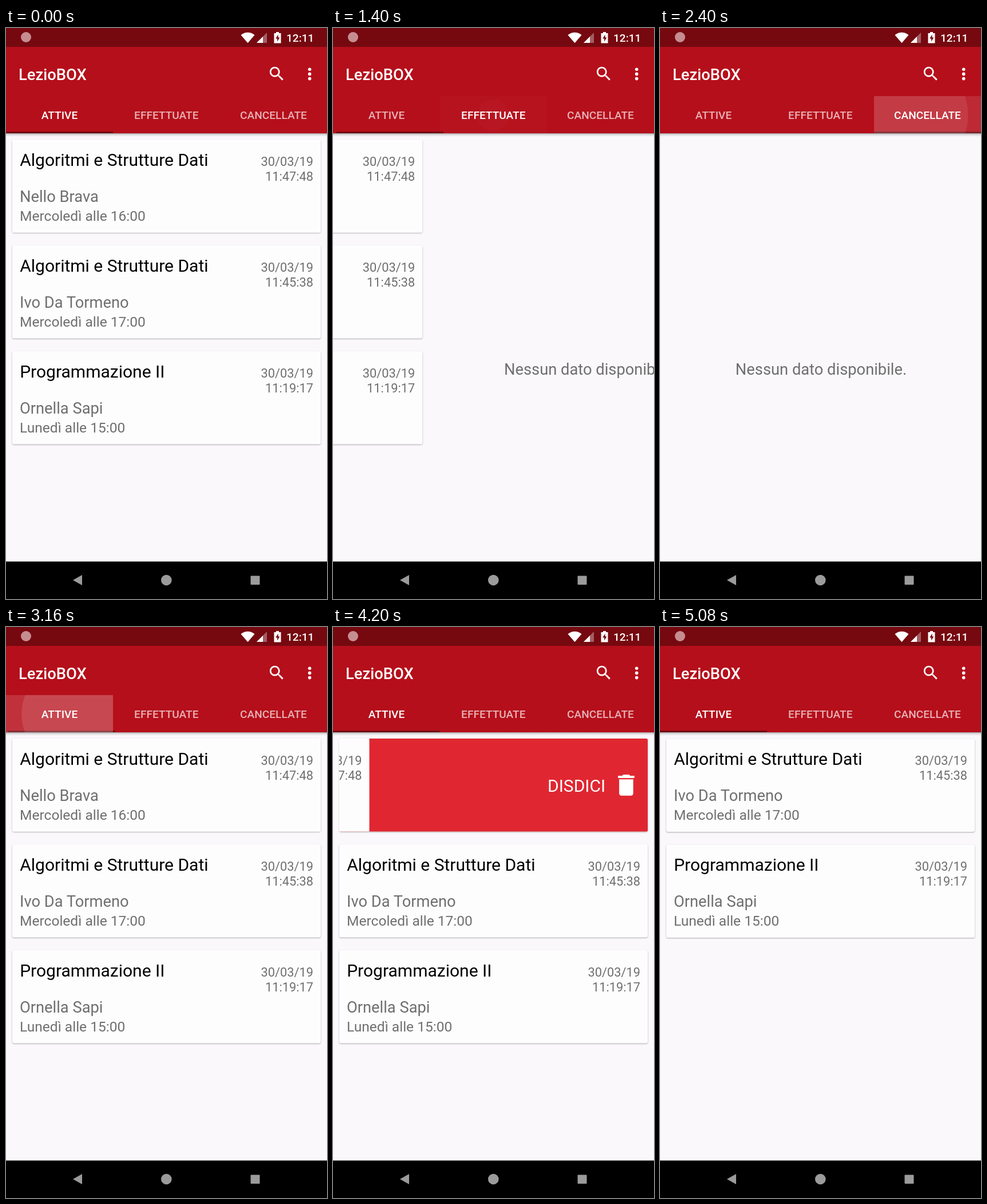
Recreate the animation shown at these times as an HTML page. Size 561 px wide and 998 px high, loop 5.52 s.

```html
<!DOCTYPE html>
<html lang="it">
<head>
<meta charset="utf-8">
<style>
  html, body { margin: 0; width: 100%; height: 100%; overflow: hidden; background: #faf8fb; }
  #stage { display: block; width: 561px; height: 998px; font-family: Roboto, sans-serif; }
  .medium { font-weight: 500; }
  .tab { font-size: 19.1px; text-anchor: middle; fill: #fff; }
  .course { font-size: 30px; fill: #000; }
  .grey { fill: #6f6f6f; }
  .big { font-size: 27.3px; }
  .slot { font-size: 24.55px; }
  .stamp { font-size: 21.8px; text-anchor: end; }
  .shadow { filter: drop-shadow(0 1.5px 1.3px rgba(0, 0, 0, .32)); }
</style>
</head>
<body>
<svg id="stage" viewBox="0 0 561 998" xmlns="http://www.w3.org/2000/svg">
  <defs>
    <clipPath id="frame"><rect x="10.5" y="195" width="540" height="163" rx="3"/></clipPath>
    <linearGradient id="drop" x2="0" y2="1">
      <stop offset="0" stop-color="#000" stop-opacity=".36"/>
      <stop offset=".4" stop-color="#000" stop-opacity=".12"/>
      <stop offset="1" stop-color="#000" stop-opacity="0"/>
    </linearGradient>
  </defs>
  <rect width="561" height="998" fill="#faf8fb"/>

  <g id="pages">
    <g id="cards"></g>
    <text class="grey big" x="842.5" y="606" text-anchor="middle">Nessun dato disponibile.</text>
    <text class="grey big" x="1403.5" y="606" text-anchor="middle">Nessun dato disponibile.</text>
  </g>

  <rect y="184" width="561" height="6" fill="url(#drop)"/>
  <rect y="32" width="561" height="152" fill="#b50f1b"/>
  <rect width="561" height="33" fill="#760910"/>

  <g fill="#fff">
    <circle cx="35" cy="16" r="9" fill="#c68d91"/>
    <path d="M410.5 12.2Q422.5 3.4 434.5 12.2L422.5 26.2Z"/>
    <path d="M456 8V26H438Z" opacity=".35"/>
    <path d="M449 15V26H438Z"/>
    <path d="M472 7h5v2h3.5v17.5h-12V9h3.5z"/>
    <path d="M475.6 11.5l-4.4 7h2.9v5.2l4.3-7.2h-2.8z" fill="#760910"/>
    <text class="medium" x="490" y="24" font-size="19.1">12:11</text>
    <text class="medium" x="22" y="91" font-size="27.3">LezioBOX</text>
    <path transform="translate(456.8 63.7) scale(1.364)" d="M15.5 14h-.79l-.28-.27C15.41 12.59 16 11.11 16 9.5 16 5.91 13.09 3 9.5 3S3 5.91 3 9.5 5.91 16 9.5 16c1.61 0 3.09-.59 4.23-1.57l.27.28v.79l5 4.99L20.49 19l-4.99-5zm-6 0C7.01 14 5 11.99 5 9.5S7.01 5 9.5 5 14 7.01 14 9.5 11.99 14 9.5 14z"/>
    <circle cx="530.7" cy="72.2" r="2.8"/>
    <circle cx="530.7" cy="80.4" r="2.8"/>
    <circle cx="530.7" cy="88.6" r="2.8"/>
  </g>

  <rect id="indicator" y="181.2" width="187" height="2.8" fill="#6d0910"/>
  <svg id="ripple" y="119" width="187" height="65" fill="#fff">
    <rect width="187" height="65" opacity=".14"/>
    <circle id="wave" cy="33" opacity=".11"/>
  </svg>
  <text class="tab medium" x="93.5" y="159">ATTIVE</text>
  <text class="tab medium" x="280.3" y="159">EFFETTUATE</text>
  <text class="tab medium" x="467.5" y="159">CANCELLATE</text>

  <rect y="932.5" width="561" height="65.5"/>
  <g fill="#9b9b9b">
    <path d="M117 965L133 956V974Z"/>
    <circle cx="280.3" cy="965" r="9.3"/>
    <rect x="427.5" y="957.5" width="16" height="15.5" rx="1"/>
  </g>
</svg>

<script>
const LOOP = 5520, WIDTH = 561, TAB = 187, PITCH = 185;
const $ = id => document.getElementById(id);

const bookings = [
  ['Algoritmi e Strutture Dati', 'Nello Brava', 'Mercoledì alle 16:00', '11:47:48'],
  ['Algoritmi e Strutture Dati', 'Ivo Da Tormeno', 'Mercoledì alle 17:00', '11:45:38'],
  ['Programmazione II', 'Ornella Sapi', 'Lunedì alle 15:00', '11:19:17']
];

const box = attrs => `<rect x="11" y="195" width="539" height="162.5" ${attrs}/>`;
const base = box('class="shadow" rx="3" fill="#fefdfe"');
const content = ([course, tutor, slot, time]) => `
  <text class="course" x="24.2" y="241">${course}</text>
  <text class="grey big" x="24" y="304">${tutor}</text>
  <text class="grey slot" x="24" y="337">${slot}</text>
  <text class="grey stamp" x="537" y="241">30/03/19</text>
  <text class="grey stamp" x="537" y="267">${time}</text>`;

const swipeable = booking => `
  <g id="paper">${base}</g>
  ${box('id="shade" rx="3"')}
  <g clip-path="url(#frame)">
    <g id="cancel" fill="#fff">
      ${box('rx="2" fill="#e02731"')}
      <text x="375" y="288" font-size="30">DISDICI</text>
      <path transform="translate(487.8 251.8) scale(2.05)" d="M6 19c0 1.1.9 2 2 2h8c1.1 0 2-.9 2-2V7H6v12zM19 4h-3.5l-1-1h-5l-1 1H5v2h14V4z"/>
    </g>
    <g id="sheet">
      ${box('rx="1" fill="#fefdfe"')}
      ${content(booking)}
    </g>
  </g>`;

$('cards').innerHTML = bookings.map((b, i) =>
  `<g transform="translate(0 ${i * PITCH})">${i ? base + content(b) : swipeable(b)}</g>`).join('');
const cards = [...$('cards').children];
const tabs = [...document.querySelectorAll('.tab')];

// Each tap: start time, tab left, tab opened, ripple centre inside the tab
const taps = [
  { at: 1361, from: 0, to: 1, cx: 93 },
  { at: 2041, from: 1, to: 2, cx: 67 },
  { at: 2893, from: 2, to: 0, cx: 118 }
];
const swipe = [[3740, 0], [3800, 10], [3880, 45], [3960, 115], [4040, 225], [4120, 365], [4240, 545]];

const clamp = v => Math.min(1, Math.max(0, v));
const span = (t, start, length) => clamp((t - start) / length);
const mix = (a, b, k) => a + (b - a) * k;
const quintOut = k => 1 - (1 - k) ** 5;
const cosine = k => (1 - Math.cos(Math.PI * k)) / 2;

// cubic-bezier(.4, 0, .2, 1)
function standard(x) {
  let lo = 0, hi = 1;
  for (let i = 0; i < 20; i++) {
    const s = (lo + hi) / 2, r = 1 - s;
    if (1.2 * r * r * s + .6 * r * s * s + s ** 3 < x) lo = s; else hi = s;
  }
  return lo * lo * (3 - 2 * lo);
}

function track(points, t) {
  const i = points.findIndex(p => p[0] > t);
  if (i === 0) return points[0][1];
  if (i < 0) return points[points.length - 1][1];
  const [t0, v0] = points[i - 1], [t1, v1] = points[i];
  return mix(v0, v1, (t - t0) / (t1 - t0));
}

const shift = (el, x, y) => el.setAttribute('transform', `translate(${x} ${y})`);
const show = (id, on) => $(id).setAttribute('visibility', on ? 'inherit' : 'hidden');

function drawTabs(t) {
  const tap = taps.filter(p => t >= p.at).pop();
  let page = 0, mark = 0, alpha = 0;
  if (tap) {
    const age = t - tap.at;
    const pages = Math.abs(tap.to - tap.from);
    page = mix(tap.from, tap.to, quintOut(clamp(age / (93 * (pages + 1)))));
    mark = mix(tap.from, tap.to, standard(span(age, 7, 300)));
    alpha = span(age, 25, 110) * (1 - span(age, 280, 380));
    $('ripple').setAttribute('x', tap.to * TAB);
    $('wave').setAttribute('cx', tap.cx);
    $('wave').setAttribute('r', 104 * (1 - Math.exp(-age / 130)));
  }
  const active = tap ? tap.to : 0;
  tabs.forEach((el, i) => el.setAttribute('fill-opacity', i === active ? 1 : .68));
  shift($('pages'), -page * WIDTH, 0);
  $('indicator').setAttribute('x', mark * TAB);
  $('ripple').setAttribute('opacity', alpha);
}

function drawCards(t) {
  shift($('sheet'), -track(swipe, t), 0);
  show('sheet', t < 4240);
  show('cancel', t > 3740);

  // The card's own shadow shows through while it fades
  const left = 1 - span(t, 4795, 120);
  $('paper').setAttribute('opacity', left);
  $('cancel').setAttribute('opacity', left);
  $('shade').setAttribute('opacity', left < 1 ? .24 * left : 0);

  const lift = 184.6 * cosine(span(t, 4900, 180));
  for (let i = 1; i < cards.length; i++) shift(cards[i], 0, i * PITCH - lift);
}

const start = performance.now();
function tick() {
  const t = (performance.now() - start) % LOOP;
  drawTabs(t);
  drawCards(t);
  requestAnimationFrame(tick);
}
tick();
</script>
</body>
</html>
```
